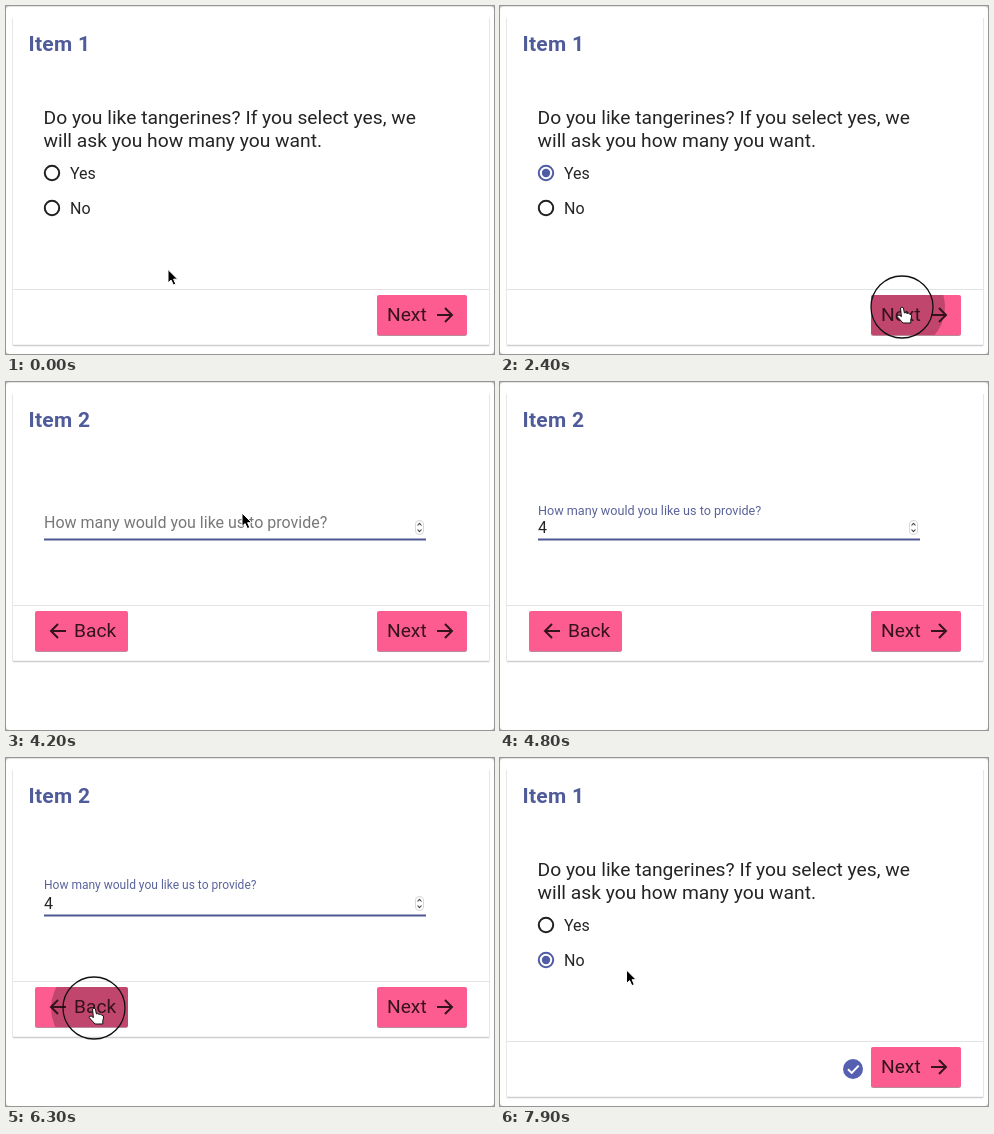
An HTML page that plays this animation: 488 by 348 pixels, repeating every 8 s.

```html
<!DOCTYPE html>
<html lang="en">
<head>
<meta charset="utf-8">
<title>Question steps</title>
<style>
  html, body { margin: 0; width: 100%; height: 100%; overflow: hidden; background: #fff; }
  svg { display: block; width: 488px; height: 348px; font-family: Roboto, Arial, sans-serif; }
  .title { font-size: 21px; font-weight: 700; letter-spacing: .3px; fill: #505b9a; }
  .question { font-size: 19.25px; fill: #242424; }
  .option { font-size: 16px; fill: #242424; }
  .button text { font-size: 19.2px; fill: #34131f; }
  .button path { fill: none; stroke: #34131f; stroke-width: 2; }
</style>
</head>
<body>
<svg viewBox="0 0 488 348">
  <defs>
    <clipPath id="nextClip"><rect x="371" y="289" width="90" height="40" rx="2"/></clipPath>
    <clipPath id="backClip"><rect x="29" y="229" width="93" height="40" rx="2"/></clipPath>
    <g id="nextButton" class="button">
      <rect x="371" y="290" width="90" height="40" rx="2.5" fill="#b98a99"/>
      <rect x="371" y="289" width="90" height="40" rx="2" fill="#fd5c90"/>
    </g>
    <g id="nextLabel" class="button">
      <text x="381" y="315">Next</text>
      <path d="M431 309H446M439 302l7 7l-7 7"/>
    </g>
  </defs>

  <rect width="488" height="348" fill="#c9c9c9"/>
  <rect y=".5" width="488" height="347.5" rx="4" fill="#fff"/>

  <g id="card" fill="none">
    <path id="sides" stroke="#e7e7e7"/>
    <path id="bottom" stroke="#cfcfcf" stroke-width="1.5"/>
    <path id="divider" stroke="#e3e3e3"/>
  </g>
  <text id="title" class="title" x="22.5" y="45"></text>

  <g id="choicePage">
    <text class="question" x="37.5" y="118">Do you like tangerines? If you select yes, we</text>
    <text class="question" x="37.5" y="141">will ask you how many you want.</text>
    <g id="yes"><circle class="ring" cx="46" cy="167" r="7.2" fill="none" stroke-width="2"/><circle class="dot" cx="46" cy="167" r="4.2" fill="#505ca3"/></g>
    <text class="option" x="64" y="172.5">Yes</text>
    <g id="no"><circle class="ring" cx="46" cy="202" r="7.2" fill="none" stroke-width="2"/><circle class="dot" cx="46" cy="202" r="4.2" fill="#505ca3"/></g>
    <text class="option" x="64" y="208">No</text>
    <g id="check">
      <circle cx="353" cy="311" r="10" fill="#5561b0"/>
      <path d="M348 311.2l3.7 3.7l7-7.3" fill="none" stroke="#fff" stroke-width="2"/>
    </g>
  </g>

  <g id="numberPage">
    <text id="label" font-size="16">How many would you like us to provide?</text>
    <text id="value" class="option" x="38" y="150.5">4</text>
    <path d="M38 157.5H420" stroke="#949494"/>
    <path id="underline" d="M38 157.5H420" stroke-width="2"/>
    <g id="spinner" fill="none">
      <rect x="409.5" y="138.5" width="8" height="14" rx="3.5" fill="#fff" stroke="#d8d8d8"/>
      <path d="M411.5 143.5l2-2.2l2 2.2M411.5 147.5l2 2.2l2-2.2" stroke="#444" stroke-width="1.1"/>
    </g>
    <g class="button">
      <rect x="29" y="230" width="93" height="40" rx="2.5" fill="#b98a99"/>
      <rect x="29" y="229" width="93" height="40" rx="2" fill="#fd5c90"/>
      <circle id="backRipple" cx="88" cy="250" r="43" fill="#000" opacity=".24" clip-path="url(#backClip)"/>
      <text x="68" y="255">Back</text>
      <path d="M60 249H45M52 242l-7 7l7 7"/>
    </g>
  </g>

  <g id="next">
    <use href="#nextButton"/>
    <circle id="nextRipple" cx="402" cy="301" r="43" fill="#000" opacity=".24" clip-path="url(#nextClip)"/>
    <use href="#nextLabel"/>
  </g>

  <circle id="clickRing" r="31" fill="none" stroke="#111" stroke-width="1.3"/>
  <g id="pointer">
    <path id="arrow" d="M0 0V13.4L3.1 10.6L5.4 15.6L7.8 14.5L5.6 9.7H9.7Z" fill="#000" stroke="#fff"/>
    <path id="hand" d="M-1.5 1Q0-.8 1.4 1L2.4 6Q4 4.8 5 6.4Q6.8 5.4 7.6 7.2Q9.4 6.8 9.6 9L8.8 13V16H1L-4.8 9.6Q-4.6 7.4-2.6 8.2L-.6 9.6Z" fill="#fff" stroke="#111"/>
  </g>
</svg>
<script>
const $ = id => document.getElementById(id);
const LOOP = 8000, STEP = 100;
const between = (t, from, to) => t >= from && t < to;
const clamp = v => Math.min(1, Math.max(0, v));
const progress = (t, start, length) => clamp((t - start) / length);
const smooth = p => p * p * (3 - 2 * p);
const easeOut = p => 1 - (1 - p) ** 2;
const show = (id, on) => $(id).setAttribute('display', on ? 'inline' : 'none');
const set = (id, name, value) => $(id).setAttribute(name, value);

// Pointer moves: start, end, from, to, easing
const moves = [
  [0, 700, [162, 263.5], [67, 166], smooth],
  [1400, 1500, [67, 166], [165, 201], smooth],
  [1500, 2300, [165, 201], [402, 301], easeOut],
  [2800, 3600, [402, 301], [236, 136], smooth],
  [3700, 4100, [236, 136], [236, 131], smooth],
  [5300, 5600, [236, 131], [188, 206], smooth],
  [5600, 6200, [188, 206], [88, 250], easeOut],
  [6900, 7300, [88, 250], [73, 202], smooth],
  [7800, 7900, [73, 202], [126.5, 212], smooth]
];
const clicks = [900, 2400, 3700, 6300, 7500];

function pointerAt(t) {
  const [start, end, from, to, ease] = moves.filter(m => t >= m[0]).pop();
  const p = ease(progress(t, start, end - start));
  return from.map((v, i) => v + (to[i] - v) * p);
}

function setRadio(id, selected) {
  $(id).querySelector('.ring').setAttribute('stroke', selected ? '#505ca3' : '#202020');
  $(id).querySelector('.dot').setAttribute('display', selected ? 'inline' : 'none');
}

function drawCard(bottom) {
  set('sides', 'd', `M6.5 12V${bottom}M483.5 12V${bottom}`);
  set('bottom', 'd', `M7 ${bottom}H483`);
  set('divider', 'd', `M7 ${bottom - 56}H483`);
}

function drawField(t, y) {
  const typed = t >= 4600;
  const focus = progress(t, 3700, 300);
  const hover = t >= 3700 || (t > 2800 && y < 165);
  const float = smooth(progress(t, 4500, 400));
  set('label', 'transform', `translate(38 ${146 - 15 * float}) scale(${1 - .25 * float})`);
  set('label', 'fill', typed ? '#5a639b' : '#777');
  show('value', typed);
  show('spinner', hover);
  show('underline', hover);
  set('underline', 'stroke', focus > 0 ? '#4d5892' : '#303030');
}

function draw(time) {
  const t = Math.floor(time % LOOP / STEP) * STEP;
  const [x, y] = pointerAt(t);
  const second = between(t, 2500, 6400);

  $('title').textContent = second ? 'Item 2' : 'Item 1';
  drawCard(second ? 279.5 : 339.5);
  show('choicePage', !second);
  show('numberPage', second);
  set('next', 'transform', `translate(0 ${second ? -60 : 0})`);
  show('nextRipple', t === 2400);
  show('backRipple', t === 6300);
  setRadio('yes', between(t, 900, 7500));
  setRadio('no', t >= 7500);
  show('check', t >= 6400);
  if (second) drawField(t, y);

  const overOption = !second && x < 90 && (Math.abs(y - 167) < 12 || Math.abs(y - 202) < 12);
  const overNext = !second && x > 371 && y > 289;
  const overBack = second && x < 122 && y > 229;
  const hand = overOption || overNext || overBack;
  show('arrow', !hand);
  show('hand', hand);
  show('pointer', !between(t, 4600, 5400));
  set('pointer', 'transform', `translate(${x} ${y})`);
  show('clickRing', clicks.includes(t));
  set('clickRing', 'cx', x);
  set('clickRing', 'cy', y);
}

const origin = performance.now();
function tick() {
  draw(performance.now() - origin);
  requestAnimationFrame(tick);
}
draw(0);
requestAnimationFrame(tick);
</script>
</body>
</html>
```
